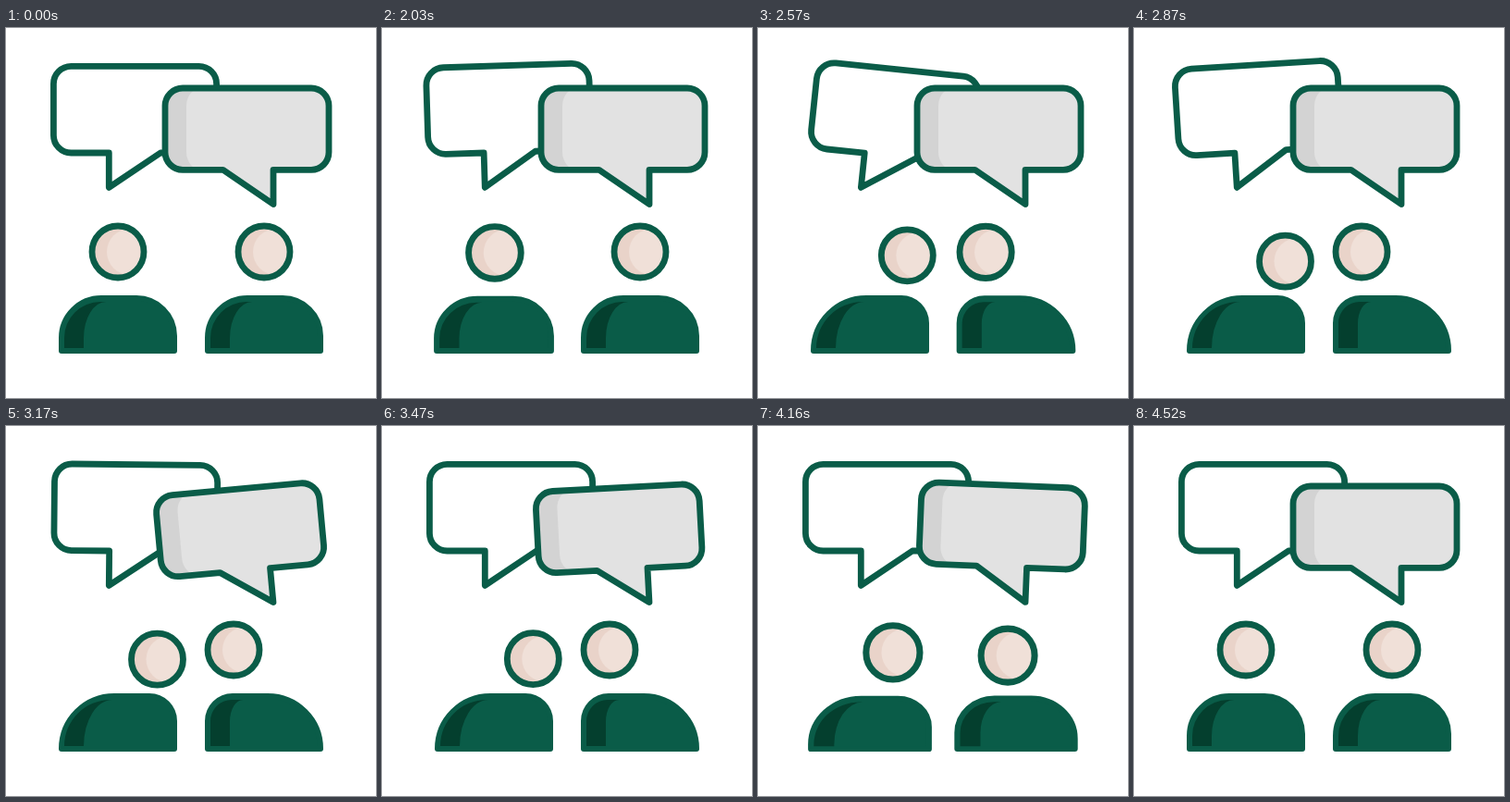
These frames come from a looping animation (400x400 px, 4550 ms). An HTML page:

```html
<!DOCTYPE html>
<html lang="en">
<head>
<meta charset="utf-8">
<title>Conversation</title>
<style>
  html, body { margin: 0; width: 100%; height: 100%; overflow: hidden; background: #fff; }
  svg { display: block; width: 100%; height: 100%; }
  .line { stroke: #0a5c48; stroke-width: 6.8; stroke-linejoin: round; }
  .body { stroke-width: 6; }
</style>
</head>
<body>
<svg viewBox="0 0 400 400">
  <defs>
    <clipPath id="face"><circle r="28"/></clipPath>
  </defs>
  <g id="bubbleL">
    <path class="line" fill="#fff" d="M70.4 41.4H208.6A19 19 0 0 1 227.6 60.4V116A19 19 0 0 1 208.6 135H167L111.3 172.3V135H70.4A19 19 0 0 1 51.4 116V60.4A19 19 0 0 1 70.4 41.4Z"/>
  </g>
  <g id="bubbleR">
    <path fill="#d3d3d3" d="M191 65H230V153H191A19 19 0 0 1 172 134V84A19 19 0 0 1 191 65Z"/>
    <path fill="#e2e2e2" d="M211 65H330A19 19 0 0 1 349 84V134A19 19 0 0 1 330 153.3H289V190.5L234.5 153.3H211A16 19 0 0 1 195 134V84A16 19 0 0 1 211 65Z"/>
    <path class="line" fill="none" d="M191 65H330A19 19 0 0 1 349 84V134.3A19 19 0 0 1 330 153.3H289V190.5L234.5 153.3H191A19 19 0 0 1 172 134.3V84A19 19 0 0 1 191 65Z"/>
  </g>
  <g id="people"></g>
</svg>
<script>
const LOOP = 4550, START = 2030, STEP = 30, SWING = 246, TURN = 560;
const $ = id => document.getElementById(id);
const mix = (a, b, p) => a + (b - a) * p;
const span = (t, from, length) => Math.min(1, Math.max(0, (t - from) / length));
const ease = p => (1 - Math.cos(Math.PI * p)) / 2;

function add(parent, tag, attrs) {
  const el = document.createElementNS("http://www.w3.org/2000/svg", tag);
  for (const k in attrs) el.setAttribute(k, attrs[k]);
  return parent.appendChild(el);
}

function person(data) {
  const root = $("people");
  const body = add(root, "g", {});
  data.body = body;
  data.shape = add(body, "path", { class: "line body", fill: "#0a5c48" });
  data.shade = add(body, "path", { fill: "#043f2e" });
  data.head = add(root, "g", {});
  add(data.head, "circle", { r: 28, fill: "#e9d3c9" });
  add(data.head, "circle", { cx: 13, r: 25, fill: "#f0e0d8", "clip-path": "url(#face)" });
  add(data.head, "circle", { class: "line", r: 28, fill: "none" });
  return data;
}

// side: radius of the left and right shoulder when turned
const people = [
  person({ x: 121, shift: 39, side: [57, 27], turn: 1975, back: 3930,
           nod: [3.5, 10.2], down: 2490, up: 3440 }),
  person({ x: 279, shift: -33, side: [27, 57], turn: 2030, back: 3795,
           nod: [0, 12.8], down: 3570, up: 3795, rise: TURN })
];

function drawPerson(p, t) {
  const go = span(t, p.turn, TURN), back = span(t, p.back, TURN);
  const turned = ease(go) - ease(back);
  const squash = Math.sin(Math.PI * go) + Math.sin(Math.PI * back);
  const nod = ease(span(t, p.down, 190)) - ease(span(t, p.up, p.rise || 200));

  const hx = p.x + p.shift * turned + p.nod[0] * nod;
  const hy = 242 + 3 * squash + p.nod[1] * nod;
  p.head.setAttribute("transform",
    `translate(${hx} ${hy}) scale(${1 + 0.04 * squash})`);

  const l = mix(43, p.side[0], turned), r = mix(41, p.side[1], turned);
  p.shape.setAttribute("d",
    `M-61 -3V${l - 60}A${l} ${l} 0 0 1 ${l - 61} -60H${61 - r}A${r} ${r} 0 0 1 61 ${r - 60}V-3Z`);
  const s = Math.min(50, l - 4), rx = s * 0.62;
  p.shade.setAttribute("d",
    `M-58 -6V${s - 56}A${s} ${s} 0 0 1 ${s - 58} -56H${Math.max(s - 58, rx - 37)}` +
    `L${rx - 37} -56A${rx} ${s} 0 0 0 -37 ${s - 56}V-6Z`);
  p.body.setAttribute("transform",
    `translate(${p.x} 352) scale(${1 + 0.047 * squash} ${1 - 0.045 * squash})`);
}

function swing(keys, t, from) {
  const u = span(t, from, SWING * (keys.length - 1)) * (keys.length - 1);
  const i = Math.min(keys.length - 2, Math.floor(u));
  return mix(keys[i], keys[i + 1], u - i);
}

function draw(time) {
  const ms = time % LOOP;
  const t = ms < START ? 0 : START + STEP * Math.floor((ms - START) / STEP);
  const left = swing([0, -20, 12, -9.3, 2, 0], t, 2008);
  const right = swing([0, -20, 15, -9, 3.3, 0], t, 3105);
  $("bubbleL").setAttribute("transform", `rotate(${left} 111 173)`);
  $("bubbleR").setAttribute("transform", `rotate(${right} 290 191)`);
  people.forEach(p => drawPerson(p, t));
}

const begin = performance.now();
function tick() {
  draw(performance.now() - begin);
  requestAnimationFrame(tick);
}
tick();
</script>
</body>
</html>
```
